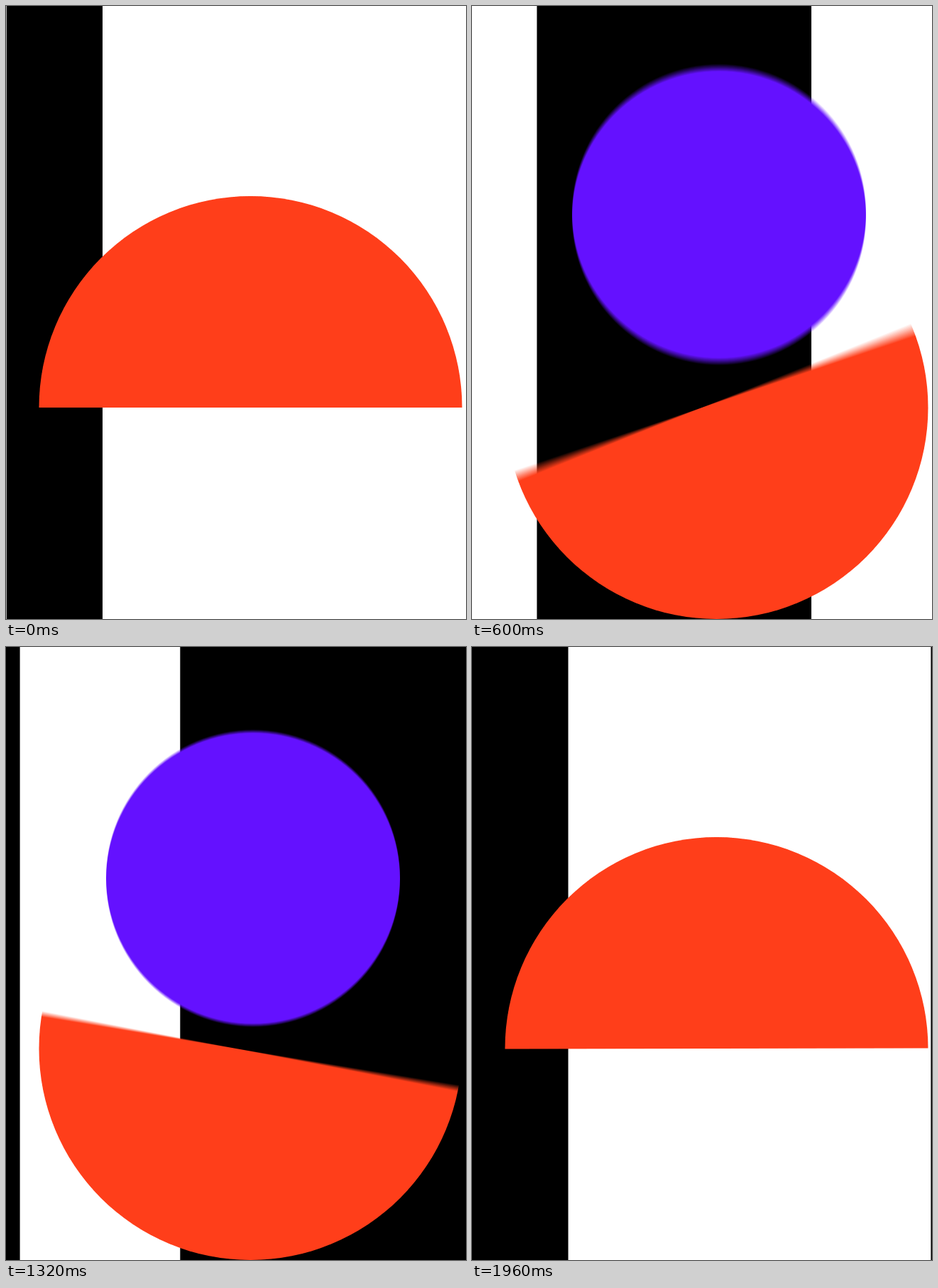
Animation, 648 px wide and 864 px high, one loop 2000 ms. Source, as an HTML page with a canvas:

```html
<!DOCTYPE html>
<html lang="en">
<head>
<meta charset="utf-8">
<title>Shape loop</title>
<style>
  html, body { margin: 0; width: 100%; height: 100%; overflow: hidden; background: #fff; }
  canvas { display: block; width: 648px; height: 864px; }
</style>
</head>
<body>
<canvas id="stage" width="648" height="864"></canvas>
<script>
const W = 648, H = 864, HALF = 1000, LOOP = 2 * HALF, STEP = 40;
const SHUTTER = 20, SAMPLES = 16;
const ORANGE = '#ff3e1a', PURPLE = '#6411ff';

const ctx = document.getElementById('stage').getContext('2d');
const layer = document.createElement('canvas');
layer.width = W;
layer.height = H;
const ink = layer.getContext('2d');

const mix = (a, b, k) => a + (b - a) * k;

// Symmetric cubic bezier easing (a, 0, 1 - a, 1), solved by bisection.
function ease(a, u) {
  let lo = 0, hi = 1;
  for (let i = 0; i < 40; i++) {
    const s = (lo + hi) / 2, r = 1 - s;
    const x = 3 * r * r * s * a + 3 * r * s * s * (1 - a) + s * s * s;
    if (x < u) lo = s; else hi = s;
  }
  return lo * lo * (3 - 2 * lo);
}

const slide = u => ease(0.42, u);
const snap = u => ease(1, u);

function phase(t) {
  const m = (t + LOOP) % LOOP;
  return { second: m >= HALF, u: (m % HALF) / HALF };
}

function drawBars(t) {
  const { second, u } = phase(t), k = slide(u);
  const lead = mix(136, W, k);
  const next = second ? mix(-12, 136, k) : mix(0.7, 136.5, k);
  const [front, back] = second ? ['#000', '#fff'] : ['#fff', '#000'];
  ctx.fillStyle = front;
  ctx.fillRect(0, 0, W, H);
  ctx.fillStyle = back;
  ctx.fillRect(next, 0, lead - next, H);
}

function disc(x, y, r) {
  ink.beginPath();
  ink.arc(x, y, r, 0, 2 * Math.PI);
  ink.fill();
}

function ball(t) {
  const { second, u } = phase(t), k = snap(u);
  disc(348, mix(-211, 358, second ? 1 - k : k), 207);
}

// A fixed disc seen through a half-plane that turns about the stage's middle.
function dome(t) {
  const { second, u } = phase(t);
  ink.save();
  ink.translate(324, 566);
  ink.rotate(Math.PI * (snap(u) + (second ? 1 : 0)));
  ink.beginPath();
  ink.rect(-1000, -1000, 2000, 1000);
  ink.clip();
  ink.setTransform(1, 0, 0, 1, 0, 0);
  disc(344.5, 566, 298);
  ink.restore();
}

// Averages a shape over the open shutter, then tints it.
function blurred(shape, color, t) {
  ink.globalCompositeOperation = 'source-over';
  ink.clearRect(0, 0, W, H);
  ink.globalCompositeOperation = 'lighter';
  ink.globalAlpha = 1 / SAMPLES;
  ink.fillStyle = '#fff';
  for (let i = 0; i < SAMPLES; i++) shape(t + SHUTTER * (i / SAMPLES - 0.5));
  ink.globalAlpha = 1;
  ink.globalCompositeOperation = 'source-in';
  ink.fillStyle = color;
  ink.fillRect(0, 0, W, H);
  ctx.drawImage(layer, 0, 0);
}

function draw(t) {
  drawBars(t);
  blurred(ball, PURPLE, t);
  blurred(dome, ORANGE, t);
}

const start = performance.now();
let shown = -1;

function tick() {
  const now = Math.max(0, performance.now() - start) % LOOP;
  const t = Math.floor(now / STEP) * STEP;
  if (t !== shown) {
    draw(t);
    shown = t;
  }
  requestAnimationFrame(tick);
}
tick();
</script>
</body>
</html>
```
